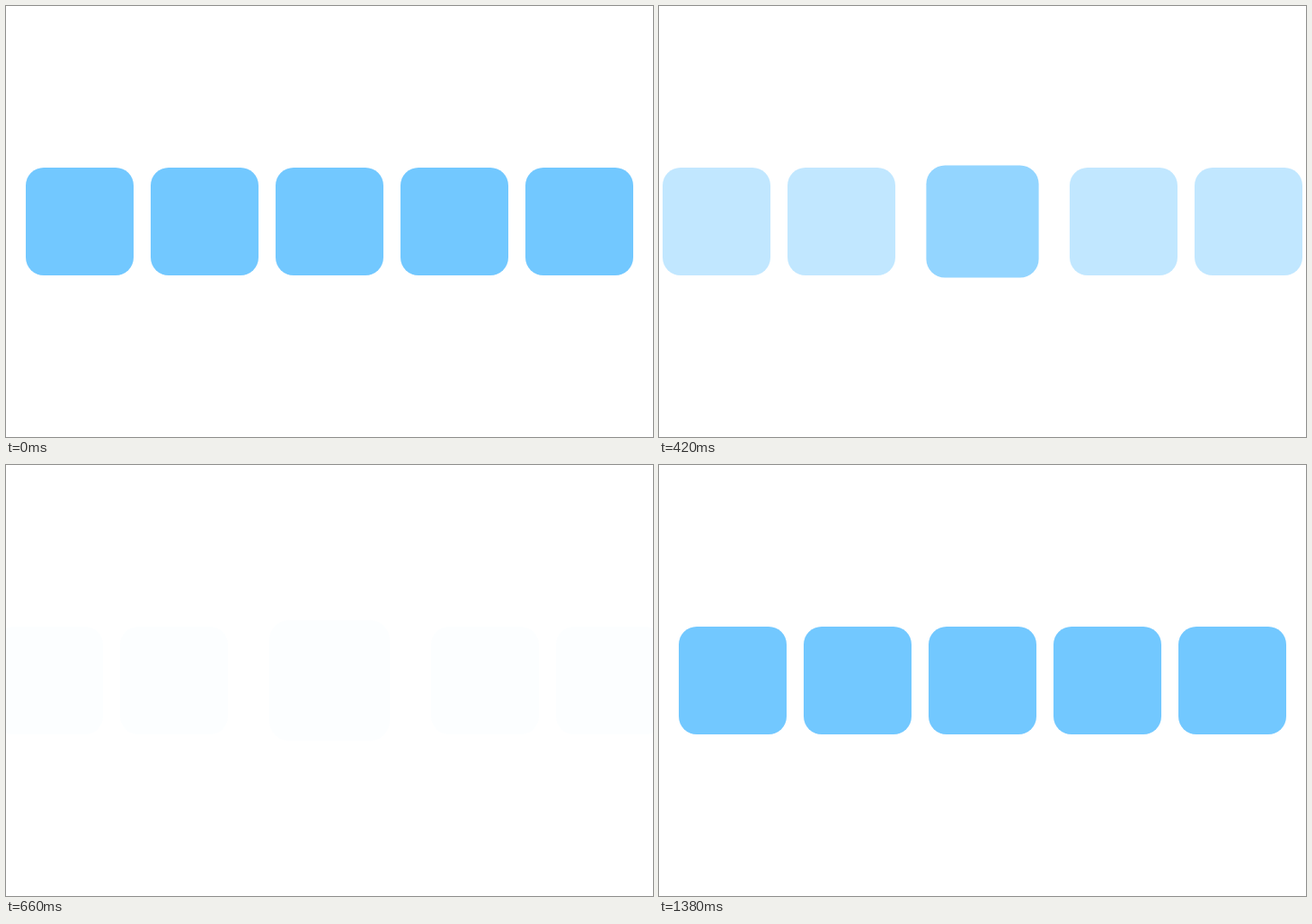
Write an HTML page with a canvas that moves like this. It is 720 px wide and 480 px high and loops after 1800 ms.

```html
<!DOCTYPE html>
<html lang="en">
<head>
<meta charset="utf-8">
<title>Five tiles</title>
<style>
  html, body { margin: 0; width: 100%; height: 100%; overflow: hidden; background: #fff; }
  canvas { display: block; width: 720px; height: 480px; }
</style>
</head>
<body>
<canvas id="stage" width="720" height="480"></canvas>
<script>
const ctx = document.getElementById('stage').getContext('2d');
const LOOP = 1800, STEP = 30;
const SIZE = 120, RADIUS = 20, PITCH = 139;
const OUT = 330, BACK = 1194, HOME = 1380;

const REST_SIDE = { shift: 34, scale: 1, alpha: 0.02 };
const REST_MID = { shift: 0, scale: 1.12, alpha: 0.025 };

const clamp = v => Math.min(1, Math.max(0, v));

// Side tiles slide outwards and fade quickly.
function sidePose(t) {
  if (t < OUT) return { shift: 0, scale: 1, alpha: 1 };
  if (t < BACK) {
    const fade = 1 - (t - OUT) / 160;
    if (fade <= 0) return REST_SIDE;
    return { shift: 18 * ((t - 300) / 120) ** 1.6, scale: 1, alpha: fade };
  }
  const p = clamp((t - BACK) / (HOME - BACK));
  return { shift: 37 * (1 - p) ** 2, scale: 1, alpha: p };
}

// The middle tile grows and fades more slowly.
function midPose(t) {
  if (t < OUT) return { shift: 0, scale: 1, alpha: 1 };
  if (t < BACK) {
    const p = (t - OUT) / 330;
    if (p >= 1) return REST_MID;
    return { shift: 0, scale: 1 + 0.18 * p ** 1.1, alpha: 1 - p ** 1.12 };
  }
  const p = clamp((t - BACK) / (HOME - BACK));
  return { shift: 0, scale: 1 + 0.18 * (1 - p) ** 2, alpha: p };
}

function drawTile(x, y, pose) {
  const size = SIZE * pose.scale;
  ctx.globalAlpha = pose.alpha;
  ctx.beginPath();
  ctx.roundRect(x - size / 2, y - size / 2, size, size, RADIUS * pose.scale);
  ctx.fill();
}

function draw(t) {
  ctx.globalAlpha = 1;
  ctx.fillStyle = '#fff';
  ctx.fillRect(0, 0, 720, 480);
  ctx.fillStyle = '#72c8ff';
  const side = sidePose(t), mid = midPose(t);
  for (let i = -2; i <= 2; i++) {
    const pose = i ? side : mid;
    drawTile(360 + i * PITCH + Math.sign(i) * pose.shift, 240, pose);
  }
}

const start = performance.now();
function tick() {
  const t = (performance.now() - start) % LOOP;
  draw(Math.floor(t / STEP) * STEP);
  requestAnimationFrame(tick);
}
tick();
</script>
</body>
</html>
```
